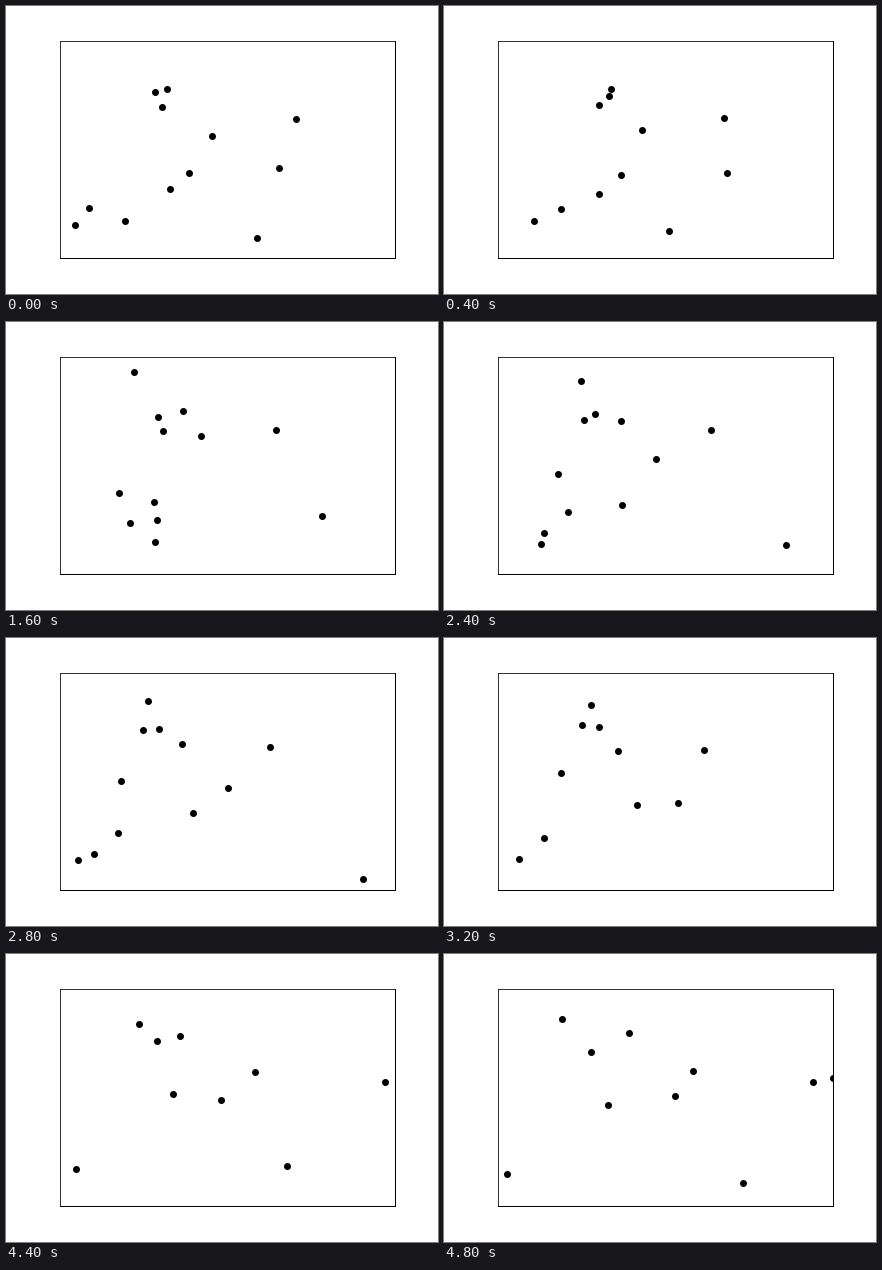
Animation, 432 px wide and 288 px high, one loop 5000 ms. Source, as a matplotlib script:

```python
import numpy as np
import matplotlib.pyplot as plt
from matplotlib.animation import FuncAnimation
from matplotlib.patches import Circle

W, H, DPI = 432, 288, 72
FRAMES, INTERVAL = 25, 200
LAST = FRAMES - 1
LEFT, RIGHT, BOTTOM, TOP = 0.125, 0.9, 0.125, 0.88

fig = plt.figure(figsize=(W / DPI, H / DPI), dpi=DPI, facecolor="white")
ax = fig.add_axes([LEFT, BOTTOM, RIGHT - LEFT, TOP - BOTTOM])
# Data units are stage pixels, y pointing down.
ax.set_xlim(LEFT * W, RIGHT * W)
ax.set_ylim((1 - BOTTOM) * H, (1 - TOP) * H)
ax.set_xticks([])
ax.set_yticks([])
ax.spines[["left", "top"]].set_linewidth(0.8)
ax.spines[["right", "bottom"]].set_linewidth(1)


class Dot:
    """A particle on the polynomial path through points evenly spaced in time."""

    def __init__(self, *points, start=0, end=LAST):
        self.start, self.end = start, end
        times = np.linspace(start, end, len(points))
        self.curve = np.polyfit(times, np.array(points, float), len(points) - 1)
        self.patch = ax.add_patch(Circle((0, 0), 3.5, color="black", lw=0))

    def move(self, t):
        self.patch.set_visible(self.start <= t <= self.end)
        # Centres sit in the middle of a pixel.
        self.patch.center = tuple(np.floor(np.polyval(c, t) + 0.5) + 0.5
                                  for c in self.curve.T)


dots = [
    Dot((149, 86), (186, 104), (212, 137), (248, 180), (299, 229)),
    Dot((206, 130), (170, 114), (140, 98), (139, 81), (118, 65)),
    Dot((290, 113), (272, 109), (267, 108), (256, 114), (249, 117)),
    Dot((69, 219), (133, 204), (178, 183), (199, 159), (231, 142)),
    Dot((161, 83), (177, 89), (174, 113), (164, 151)),
    Dot((156, 101), (152, 95), (155, 89), (185, 79)),
    Dot((183, 167), (148, 180), (100, 200), (63, 220)),
    # Dots that leave
    Dot((83, 202), (67, 204), end=1),
    Dot((273, 162), (313, 191), (364, 251), end=15),
    Dot((251, 232), (187, 220), (123, 221), (59, 222), end=15),
    Dot((119, 215), (113, 171), (117, 135), end=16),
    Dot((164, 183), (115, 205), (54, 228), end=19),
    # Dots that enter
    Dot((129, 31), (132, 55), (149, 69), (147, 98), start=3),
    Dot((388, 128), (369, 128), start=20),
    Dot((393, 124), (389, 124), start=23),
]


def update(frame):
    for dot in dots:
        dot.move(frame)
    return [dot.patch for dot in dots]


anim = FuncAnimation(fig, update, frames=FRAMES, interval=INTERVAL,
                     repeat=True, repeat_delay=0, blit=False)
plt.show()
```
